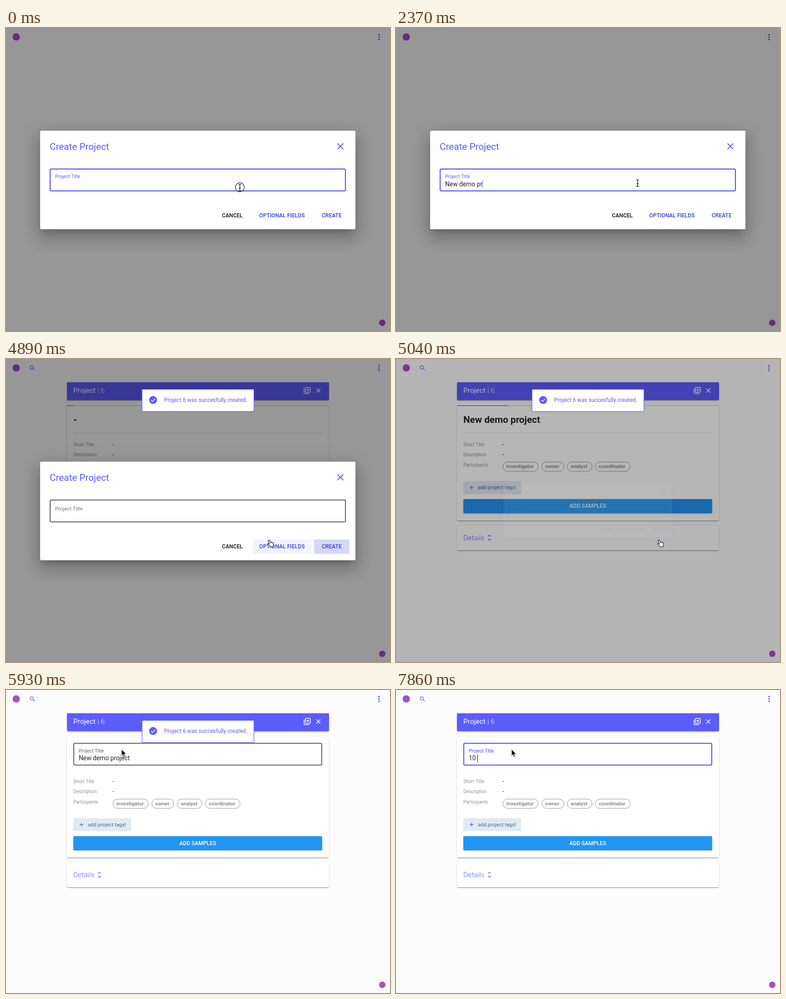
An HTML page for the animation above (8000 ms loop, 844x664 px).

```html
<!DOCTYPE html>
<html lang="en">
<head>
<meta charset="utf-8">
<title>Create project</title>
<style>
  html, body { margin: 0; width: 100%; height: 100%; overflow: hidden; background: #fcfcfc; }
  #stage { position: relative; width: 844px; height: 664px; overflow: hidden; background: #fcfcfc; }
  #stage div, svg { position: absolute; }
  svg { left: 0; top: 0; width: 844px; height: 664px; overflow: visible; }
  text { font: 400 12.07px Roboto, Arial, sans-serif; white-space: pre; fill: #212121; }
  .card {
    left: 134px; width: 575.5px; background: #fff; border-radius: 2px;
    box-shadow: 0 2.6px 1px -1.7px #0003, 0 1.7px 1.7px #00000024, 0 1px 4px #0000001f;
  }
  #dim { inset: 0; background: #000; }
  #dialog { inset: 0; transform-origin: 421.5px 333px; }
  #panel {
    left: 75px; top: 225px; width: 693px; height: 216px; background: #fff; border-radius: 3px;
    box-shadow: 0 9.5px 13px -6px #0003, 0 20.7px 32.8px 2.6px #00000024, 0 7.8px 39.7px 6.9px #0000001f;
  }
  .blue { fill: #5c5cff; }
  .line { fill: none; stroke: #5c5cff; }
  .head { font-size: 20.7px; }
  .mid { font-size: 15.5px; }
  .input { font-size: 13.8px; }
  .small { font-size: 10.34px; }
  .light { font-weight: 300; }
  .key { font-size: 10.34px; font-weight: 300; fill: #616161; }
  .btn { font-weight: 500; fill: #3040dd; }
  .chip { font-size: 11.3px; font-weight: 700; fill: #909090; }
</style>
</head>
<body>
<div id="stage">
  <div id="project">
    <div class="card" style="top:51px;height:39px;background:#5c5cff"></div>
    <div class="card" id="main" style="top:102px"></div>
    <div class="card" id="details" style="height:53.5px"></div>
    <svg>
      <g class="blue">
        <path transform="translate(50.6 12.4) scale(.63)" d="M15.5 14h-.79l-.28-.27A6.47 6.47 0 0 0 16 9.5 6.5 6.5 0 1 0 9.5 16c1.61 0 3.09-.59 4.23-1.57l.27.28v.79l5 4.99L20.49 19zM9.5 14a4.5 4.5 0 1 1 0-9 4.5 4.5 0 0 1 0 9z"/>
      </g>
      <text class="mid" x="148" y="74.3" style="fill:#fff">Project</text>
      <text class="mid light" x="201" y="74.3" style="fill:#fff">| 6</text>
      <path fill="#fff" transform="translate(653 60) scale(.75)" d="M4 6H2v14c0 1.1.9 2 2 2h14v-2H4zm16-4H8a2 2 0 0 0-2 2v12c0 1.1.9 2 2 2h12a2 2 0 0 0 2-2V4a2 2 0 0 0-2-2zm0 14H8V4h12zm-7-2h2v-3h3V9h-3V6h-2v3h-3v2h3z"/>
      <path stroke="#fff" stroke-width="1.6" d="M682 64.5l9 9m0-9l-9 9"/>
      <g id="bar">
        <path stroke="#b9b9ff" d="M134 102.3H709.5"/>
        <path id="done" stroke="#5c5cff" stroke-width="1.3"/>
      </g>
      <g id="view">
        <text id="title" class="head" x="148" y="139.7" style="font-weight:700"></text>
        <path stroke="#dcdcdc" d="M148 162H695"/>
      </g>
      <g id="edit">
        <rect id="editBox" x="149" y="116.7" width="545" height="47.8" rx="2.5" fill="#fff" stroke-width="2"/>
        <text id="editLabel" class="small" x="160" y="136.8">Project Title</text>
        <rect id="mark" x="160" y="141" height="17" fill="#b3d7ff"/>
        <text id="editText" class="input" x="160" y="154"></text>
        <rect id="editCaret" y="141" width="1" height="17"/>
      </g>
      <g id="lower">
        <text class="key" x="148" y="190.8">Short Title</text>
        <text class="key" x="148" y="213">Description</text>
        <text class="key" x="148" y="236">Participants</text>
        <text x="234" y="191">-</text>
        <text x="234" y="213">-</text>
        <g id="chips"></g>
        <rect x="148" y="267.5" width="127" height="28.5" rx="1.5" fill="#e1eaf2"/>
        <path class="line" stroke-width="1.3" d="M162 281.7h8m-4-4v8"/>
        <text x="180" y="285.3" style="font-size:11.25px;fill:#3a6a98">add project tags!</text>
        <rect x="148" y="307" width="546.8" height="31" rx="2" fill="#2196f3" style="filter:drop-shadow(0 1px 1px #0005)"/>
        <text x="421.5" y="326.4" text-anchor="middle" style="font-weight:500;fill:#fff">ADD SAMPLES</text>
        <text class="mid light blue" x="148" y="396.8">Details</text>
        <path class="line" stroke-width="1.3" d="M202.3 389l3-3 3 3m-6 5l3 3 3-3"/>
      </g>
    </svg>
  </div>
  <svg>
    <circle cx="22.5" cy="19.5" r="8" fill="#a84fc4"/>
    <circle cx="827" cy="646" r="7" fill="#a84fc4"/>
    <g class="blue">
      <circle cx="820" cy="14.6" r="1.8"/><circle cx="820" cy="19.8" r="1.8"/><circle cx="820" cy="25" r="1.8"/>
    </g>
  </svg>
  <div id="dim"></div>
  <div id="dialog">
    <div id="panel"></div>
    <svg>
      <text class="head blue" x="96" y="266.8">Create Project</text>
      <path class="line" stroke-width="2" d="M728.7 253l12.6 12.6m0-12.6l-12.6 12.6"/>
      <rect id="box" x="97" y="309" width="649" height="48" rx="2.5" fill="#fff" stroke-width="2"/>
      <text id="label" x="108">Project Title</text>
      <text id="input" class="input" x="108" y="346.6"></text>
      <rect id="caret" y="334" width="1" height="16" fill="#4b4bf5"/>
      <rect id="hoverFields" x="543" y="395.5" width="128" height="31.5" rx="2" fill="#f3f3fe"/>
      <rect id="hoverCreate" x="677" y="395.5" width="77.5" height="31.5" rx="2"/>
      <text class="btn" x="474.7" y="415" style="fill:#151515">CANCEL</text>
      <text class="btn" x="556.6" y="415">OPTIONAL FIELDS</text>
      <text class="btn" x="694" y="415">CREATE</text>
    </svg>
  </div>
  <svg>
    <g id="toast">
      <rect x="299" y="66.5" width="246" height="48.5" fill="#fff" stroke="#5c5cff" stroke-width="1.2"/>
      <circle class="blue" cx="323.3" cy="89.8" r="8.7"/>
      <path fill="none" stroke="#fff" stroke-width="1.6" d="M319 90l3 3 5.7-5.8"/>
      <text class="blue" x="347.6" y="94.3">Project 6 was succesfully created.</text>
    </g>
    <g id="cursor">
      <circle id="ring" r="9.8" fill="#fff" fill-opacity=".6" stroke="#111" stroke-width="1.2"/>
      <path id="beam" fill="none" stroke="#111" stroke-width="1.3" d="M-3-7.5q3 0 3 2.5V5q0 2.500-3 2.500M3-7.500q-3 0-3 2.500V5q0 2.500 3 2.500M-1.800 1h3.600"/>
      <path id="hand" fill="#fff" stroke="#111" stroke-width="1.2" transform="translate(-6 -8)" d="M3.200 1.200c1-.6 2 0 2.400 1l1.800 4c.3-.9 2-.9 2.400.2.500-.7 1.900-.5 2.200.5.700-.4 1.700.1 1.800 1.200.3 2-.1 3.600-.8 5l-.1 2.400H6.500l-.6-1.600c-1.400-1.200-2.800-2.600-4.600-3.600-1-.9 0-2.300 1.600-1.800l2 1-2.600-6.600c-.3-.9.1-1.500.9-1.700z"/>
      <path id="arrow" fill="#000" stroke="#fff" stroke-width="1" style="filter:drop-shadow(0 1px 1px #0006)" d="M0 0V14.200l3.200-3 2.200 5.300 2.400-1-2.200-5.100h4.500z"/>
    </g>
  </svg>
</div>
<script>
const LOOP = 8000, BLUE = '#4b4bf5', RED = '#fb4246', GREY = '#606060', DARK = '#212121';
const $ = id => document.getElementById(id);
const show = (id, on) => { $(id).style.display = on ? '' : 'none'; };
const attr = (id, o) => { for (const k in o) $(id).setAttribute(k, o[k]); };

$('chips').innerHTML = [['investigator', 235, 77.5], ['owner', 320.5, 48.5], ['analyst', 376.5, 54.5], ['coordinator', 438, 76.5]]
  .map(([name, x, w]) => `<rect x="${x}" y="225.700" width="${w}" height="20.300" rx="10.100" fill="none" stroke="#909090"/>
    <text class="chip" x="${x + 7.6}" y="239.300">${name}</text>`).join('');

const start = {
  x: 514, y: 350, pointer: 'beam', ring: 1, typed: '', caret: 0, focus: 1, hoverCreate: '', hoverFields: 0,
  dim: .405, dialog: 1, scale: 1, project: 0, title: '-', bar: -1, toast: 0, dy: 0,
  edit: 0, border: GREY, label: GREY, text: '', editCaret: 0, mark: 0
};

// Each step: time in ms and what changes then
const steps = [
  [150, { x: 531, y: 340 }],
  [300, { ring: 0 }],
  [450, { caret: 1 }],
  [750, { caret: 0 }],
  [890, { typed: 'N', caret: 1 }],
  ...['e', 'ew', 'ew ', 'ew d', 'ew de', 'ew dem', 'ew demo', 'ew demo p', 'ew demo pr', 'ew demo pro',
    'ew demo proj', 'ew demo proje', 'ew demo project'].map((s, i) => [1190 + Math.floor(i * 14.75) * 10, { typed: 'N' + s }]),
  [3560, { caret: 0 }],
  [4010, { x: 655, y: 382, pointer: 'arrow' }],
  [4160, { x: 714, y: 407, pointer: 'hand', hoverCreate: '#f3f3fe' }],
  [4300, { ring: 1, hoverCreate: '#d4d8fa', focus: 0 }],
  [4450, { ring: 0 }],
  [4750, { typed: '', project: 1, toast: 1, bar: 0, x: 660, y: 405 }],
  [4890, { x: 580, y: 404, hoverFields: 1, bar: 13.5 }],
  [5040, { dim: .285, dialog: .05, scale: .534, title: 'New demo project', bar: 112 }],
  [5190, { dim: .03, dialog: 0, x: 508, y: 262, pointer: 'arrow', bar: 211 }],
  [5340, { dim: 0, x: 345, y: 176, bar: 310 }],
  [5490, { x: 254, y: 130, bar: -1 }],
  [5790, { edit: 1, text: 'New demo project', dy: 13.3 }],
  [5940, { border: BLUE, label: BLUE }],
  [6090, { editCaret: 1 }],
  [6380, { editCaret: 0, mark: 1 }],
  [6670, { text: '', mark: 0, border: RED, label: '#9548d2', dy: 18.6 }],
  [6820, { label: RED }],
  [6970, { editCaret: 1 }],
  [7270, { text: '1', border: BLUE, label: BLUE, dy: 15, toast: .6 }],
  [7420, { dy: 13.3, toast: .2 }],
  [7560, { text: '10', toast: 0 }],
  [7860, { text: '10 ' }]
];

function stateAt(t) {
  const s = { ...start };
  for (const [at, change] of steps) if (at <= t) Object.assign(s, change);
  return s;
}

function type(id, caretId, text, x, caretOn) {
  $(id).textContent = text;
  const w = text ? $(id).getComputedTextLength() : 0;
  attr(caretId, { x: x + w - .3 });
  show(caretId, caretOn);
  return w;
}

function draw(t) {
  const s = stateAt(t);
  show('project', s.project);
  $('main').style.height = 252 + s.dy + 'px';
  $('details').style.top = 365 + s.dy + 'px';
  attr('lower', { transform: `translate(0 ${s.dy})` });
  $('title').textContent = s.title;
  show('view', !s.edit);
  show('bar', s.bar >= 0);
  attr('done', { d: `M134 102.300h${Math.max(0, s.bar)}` });

  show('edit', s.edit);
  attr('editBox', { stroke: s.border });
  $('editLabel').style.fill = s.label;
  const w = type('editText', 'editCaret', s.text, 160, s.editCaret);
  attr('mark', { width: w });
  show('mark', s.mark);

  $('dim').style.opacity = s.dim;
  show('dialog', s.dialog);
  $('dialog').style.opacity = s.dialog;
  $('dialog').style.transform = `scale(${s.scale})`;
  const resting = !s.focus && !s.typed;
  attr('box', { stroke: s.focus ? BLUE : GREY });
  attr('label', { y: resting ? 332 : 329.2 });
  $('label').style.fontSize = resting ? '11.4px' : '10.34px';
  $('label').style.fill = s.focus ? '#5c5cff' : '#757575';
  type('input', 'caret', s.typed, 108, s.caret);
  attr('hoverCreate', { fill: s.hoverCreate || 'none' });
  show('hoverFields', s.hoverFields);

  show('toast', s.toast);
  $('toast').style.opacity = s.toast;
  attr('cursor', { transform: `translate(${s.x} ${s.y})` });
  show('ring', s.ring);
  attr('ring', { cy: -1 });
  for (const p of ['beam', 'hand', 'arrow']) show(p, p === s.pointer);
}

const began = performance.now();
function tick() {
  draw((performance.now() - began) % LOOP);
  requestAnimationFrame(tick);
}
tick();
</script>
</body>
</html>
```
